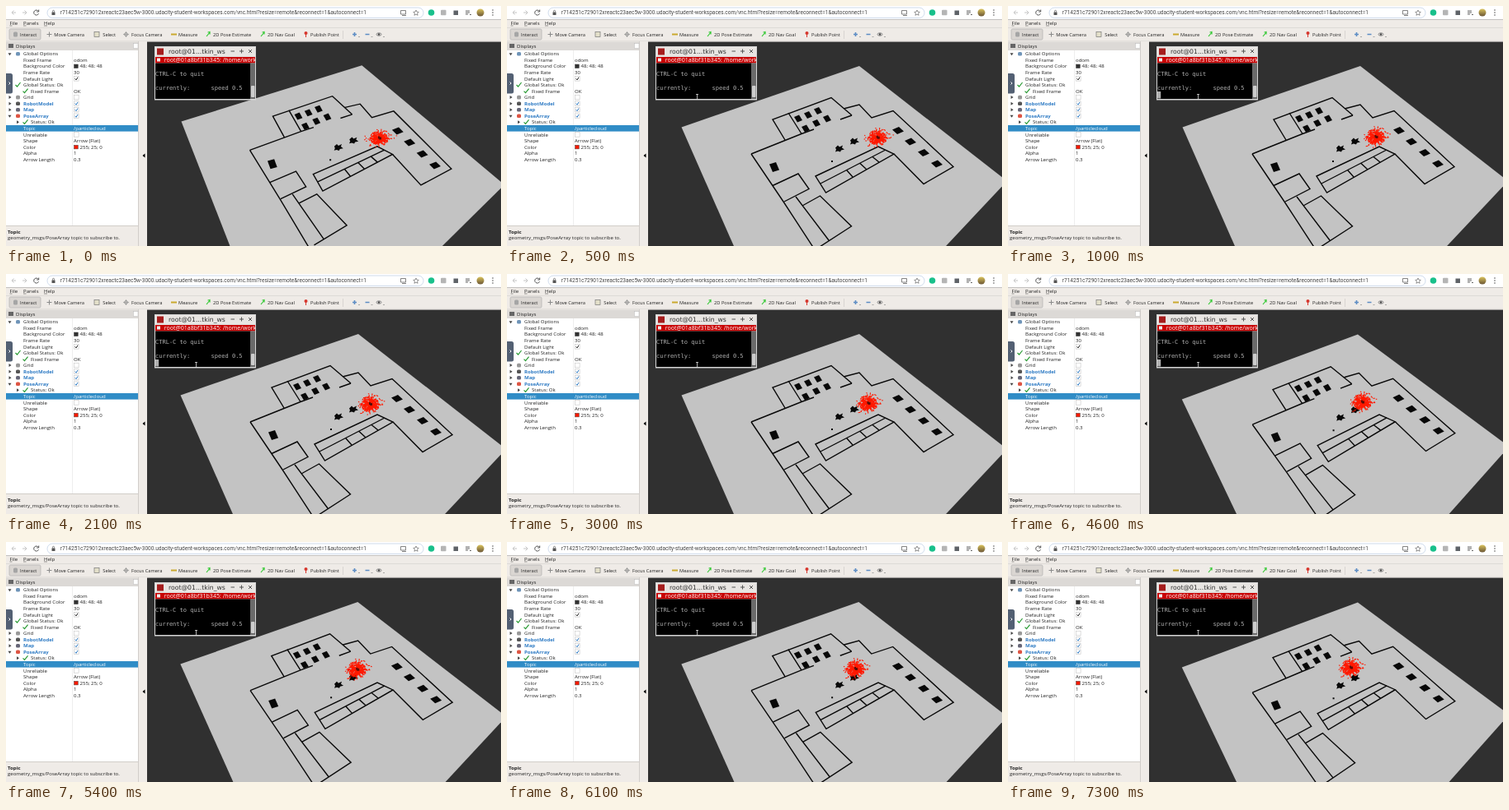
Animation, 600 px wide and 292 px high, one loop 7400 ms. Source, as an HTML page:

```html
<!DOCTYPE html>
<html lang="en">
<head>
<meta charset="utf-8">
<title>Robot localization</title>
<style>
html, body { margin: 0; width: 100%; height: 100%; overflow: hidden; background: #303030; }
svg { display: block; width: 100vw; height: 100vh; }
text { font: 6.05px "Open Sans", "Noto Sans", sans-serif; fill: #222; white-space: pre; }
.bold { font-weight: 700; }
.tool { font-size: 5.7px; }
.url { font: 6.53px Roboto, sans-serif; fill: #444; }
.title { font: 7.7px "DejaVu Sans", sans-serif; fill: #333; }
.tab { font-size: 7.05px; fill: #fff; }
.mono { font: 7.03px "DejaVu Sans Mono", monospace; fill: #b0b0b0; }
.line { fill: none; stroke: #555; stroke-width: 1; }
.walls { fill: none; stroke: #080808; stroke-width: 1.4; }
</style>
</head>
<body>
<svg viewBox="0 0 600 292" preserveAspectRatio="none">
  <defs>
    <clipPath id="view"><rect x="171" y="43" width="429" height="249"/></clipPath>
    <clipPath id="terminalClip"><rect x="180" y="49" width="122" height="64"/></clipPath>
    <linearGradient id="portrait" x2="0" y2="1">
      <stop stop-color="#d9c25c"/><stop offset="1" stop-color="#6b5636"/>
    </linearGradient>
  </defs>

  <g clip-path="url(#view)">
    <rect x="171" y="43" width="429" height="249" fill="#303030"/>
    <g id="map">
      <path fill="#c3c3c3" d="M211.500 147.500L427 73L606 213L490 337L296 340Z"/>
      <path class="walls" d="
        M337 163L322 138L393 111.500L418 133M341 130L357 155.500
        M296 180L357 155.500L372 150M404 138L418 133
        M408 125L427 120L442 136L468 127.500L541 195.500L505 216.500L469 180
        M322 218.500L353 204L366 222.500L336 238
        M374 207L450 171L469 180L386.500 227ZM380 216L459 175
        M412 200L419 208M428 191.500L436 199M443 183.500L451 190"/>
      <path class="walls" stroke-width="1.8" d="M296 180L335 238L374 298M350 232L390 285M358 243L379.500 231L417.500 268L379 293"/>
      <g id="desks" fill="#080808"></g>
    </g>
    <g id="cloud">
      <path id="arrows" fill="none" stroke="#ff1900" stroke-width="1.1"/>
      <path fill="#5a0d08" d="M-2-2h2v1h2v3h-3v-1h-1z"/>
    </g>
  </g>

  <g id="ui"></g>

  <g id="terminal">
    <rect x="180" y="49" width="123" height="65.500" fill="#d6d6d6"/>
    <rect x="181" y="50" width="121" height="11.500" fill="#e8e5e2"/>
    <rect x="183" y="51.500" width="8" height="8" fill="#a51d1d"/>
    <text class="title" x="197" y="58">root@01...tkin_ws</text>
    <path class="line" d="M272.500 55h4.500M283 55h5M285.500 52.500v5M294 53l4 4M298 53l-4 4"/>
    <rect x="181" y="62" width="121" height="7.500" fill="#c90000"/>
    <rect x="183" y="63.500" width="4" height="4" fill="#eee"/>
    <text class="tab" x="191.700" y="68" clip-path="url(#terminalClip)">root@01a8bf31b345: /home/work</text>
    <rect x="181" y="69.500" width="115.500" height="43.500"/>
    <rect x="296.500" y="69.500" width="5.500" height="43.500" fill="#6a6a6a"/>
    <rect x="297" y="97" width="4.500" height="14" rx="1" fill="#ccc"/>
    <text class="mono" x="181" y="84.700">CTRL-C to quit</text>
    <text class="mono" x="181" y="102">currently:      speed 0.5</text>
    <rect id="caret" x="181" y="104" width="4.200" height="8.500" fill="#b0b0b0"/>
    <path id="pointer" fill="none" stroke="#ddd" stroke-width=".8" d="M229 107.500h3M230.500 107.500v6M229 113.500h3"/>
  </g>
</svg>
<script>
const LOOP = 7400;
const $ = id => document.getElementById(id);

const rect = (x, y, w, h, fill, more = '') =>
  `<rect x="${x}" y="${y}" width="${w}" height="${h}" fill="${fill}" ${more}/>`;
const dot = (x, y, r, fill) => `<circle cx="${x}" cy="${y}" r="${r}" fill="${fill}"/>`;
const line = (d, color = '#555', width = 1) =>
  `<path d="${d}" fill="none" stroke="${color}" stroke-width="${width}"/>`;
const label = (x, y, text, cls = '', fill = '') =>
  `<text x="${x}" y="${y}" class="${cls}" ${fill && `style="fill:${fill}"`}>${text}</text>`;

function browserBar() {
  const url = 'r714251c729012xreactc23aec5w-3000.udacity-student-workspaces.com' +
    '/vnc.html?resize=remote&amp;reconnect=1&amp;autoconnect=1';
  return rect(0, 0, 600, 16.5, '#fff') +
    rect(50, 2, 456, 12.5, '#fff', 'rx="6.200" stroke="#c3d2e6" stroke-width=".8"') +
    line('M12 8h-5M9.500 5.500l-2.500 2.500l2.500 2.500M20 8h5M22.500 5.500l2.500 2.500l-2.500 2.500', '#c4c4c4') +
    line('M39.300 6.500a3 3 0 1 0 .2 2.700M39.700 4.500v2.500h-2.500') +
    rect(55.5, 7.5, 4, 3.5, '#555') + line('M56.500 7.500v-1.200a1 1 0 0 1 2 0v1.200', '#555', .7) +
    label(65.8, 10.4, url, 'url') +
    line('M478.500 5.500h6v4.500h-6zM480 11.500h5', '#666', .8) +
    line('M497 5l1 2.200 2.300.2-1.800 1.600.6 2.300-2.100-1.200-2.100 1.200.6-2.300-1.800-1.600 2.300-.2z', '#666', .7) +
    dot(515.5, 8, 3.8, '#19c08b') + rect(527, 4.7, 6.5, 6.5, '#b5b5b5', 'rx="1"') +
    rect(542.5, 5.5, 5.5, 5.5, '#5f6368') + line('M557 6h5M557 8h5M557 10h3M562 10.500h2', '#555', .9) +
    dot(575, 8, 4.5, 'url(#portrait)') +
    [5, 8, 11].map(y => dot(590, y, .8, '#555')).join('');
}

function toolbar() {
  const tools = [[17, 'Interact'], [58.3, 'Move Camera'], [117.3, 'Select'], [152, 'Focus Camera'],
    [209, 'Measure'], [251, '2D Pose Estimate'], [317, '2D Nav Goal'], [369, 'Publish Point']];
  return rect(0, 16.5, 600, 27, '#efebe7') +
    label(4.5, 22.9, 'File') + label(21, 22.9, 'Panels') + label(46, 22.9, 'Help') +
    line('M4.500 24h3M21 24h3.500M46 24h4', '#333', .5) +
    line('M0 26.500H600M0 42.800H600', '#d2cfcc', .6) +
    rect(4, 28, 38, 13, '#dad6d2', 'rx="1.500" stroke="#aaa" stroke-width=".6"') +
    tools.map(([x, name]) => label(x, 36.5, name, 'tool')).join('') +
    rect(9, 31.5, 5, 6, '#a5a5a5', 'rx="1.500"') +
    line('M49.500 34.500h6M52.500 31.500v6', '#8a8a8a') +
    rect(107, 31.5, 6, 6, '#e3dfc9', 'stroke="#777" stroke-width=".7"') +
    `<circle cx="145.500" cy="34.500" r="2" class="line" style="stroke:#999"/>` +
    line('M142 34.500h7M145.500 31v7', '#888', .6) +
    line('M200 34.500h7', '#caa92e', 2) +
    [243, 309].map(x => line(`M${x} 37l4-5M${x + 1.5} 32l2.500-.5v3`, '#36c936', 1.2)).join('') +
    dot(363.5, 33, 2, '#d6362c') + line('M363.500 34v4', '#d6362c') +
    line('M408.500 30v10', '#cfcbc7', .7) +
    line('M420 34.500h5M422.500 32v5M435.500 34.500h5', '#5c8cc4', 1.6) +
    `<ellipse cx="452" cy="34.500" rx="3" ry="1.700" class="line" style="stroke:#888"/>` + dot(452, 34.5, 1.2, '#444') +
    line('M427 37.500h2M442.500 37.500h2M457 37.500h2', '#888', .7);
}

function displaysPanel() {
  const blue = '#2e7bc4';
  // [indent, name, value, arrow, options]; true and false values are checkboxes.
  const rows = [
    [21, 'Global Options', '', 'v', { icon: '#6f94b8' }],
    [21, 'Fixed Frame', 'odom'],
    [21, 'Background Color', '48; 48; 48', '', { swatch: '#303030' }],
    [21, 'Frame Rate', '30'],
    [21, 'Default Light', true],
    [21, 'Global Status: Ok', '', 'v', { tick: 14 }],
    [30, 'Fixed Frame', 'OK', '', { tick: 23 }],
    [21, 'Grid', false, '>', { icon: '#999' }],
    [21, 'RobotModel', true, '>', { icon: '#555', bold: true }],
    [21, 'Map', true, '>', { icon: '#667', bold: true }],
    [21, 'PoseArray', true, 'v', { icon: '#d54', bold: true }],
    [30, 'Status: Ok', '', '>', { tick: 23, arrowX: 14 }],
    [21, 'Topic', '/particlecloud', '', { selected: true }],
    [21, 'Unreliable', false],
    [21, 'Shape', 'Arrow (Flat)'],
    [21, 'Color', '255; 25; 0', '', { swatch: '#ff1900' }],
    [21, 'Alpha', '1'],
    [21, 'Arrow Length', '0.3'],
  ];
  const drawRow = ([x, name, value, arrow, opt = {}], i) => {
    const y = 58.2 + i * 7.56;
    const ink = opt.selected ? '#fff' : opt.bold ? blue : '#222';
    const ax = opt.arrowX || 4.5;
    let out = opt.selected ? rect(0, y - 3.9, 160, 7.6, '#308cc6') : '';
    if (arrow === 'v') out += `<path d="M${ax - 2} ${y - 1}h4l-2 3z" fill="#444"/>`;
    if (arrow === '>') out += `<path d="M${ax - 1} ${y - 2}v4l3-2z" fill="#444"/>`;
    if (opt.tick) out += line(`M${opt.tick - 2.5} ${y}l2 2l4-5`, '#289a32', 1.2);
    if (opt.icon) out += rect(12, y - 2.3, 5, 4.6, opt.icon, 'rx="1.500"');
    out += label(x, y + 2.1, name, opt.bold ? 'bold' : '', ink);
    if (typeof value === 'boolean') {
      out += rect(82.5, y - 2.9, 5.6, 5.6, '#fff', 'stroke="#c5c5c5" stroke-width=".6"');
      if (value) out += line(`M83.700 ${y}l1.300 1.500l2-3.200`, opt.bold ? blue : '#222');
    } else {
      if (opt.swatch) out += rect(82.5, y - 2.3, 4.8, 4.6, opt.swatch, 'stroke="#444" stroke-width=".5"');
      out += label(opt.swatch ? 89.5 : 82, y + 2.1, value, '', ink);
    }
    return out;
  };
  return rect(0, 43, 171, 249, '#efebe7') +
    rect(0, 43.5, 160, 10.5, '#dcd9d6') + rect(3, 46, 6, 5, '#666') +
    label(12, 50.8, 'Displays') +
    rect(154.5, 45.5, 5.5, 6, '#fff', 'stroke="#bbb" stroke-width=".5"') +
    rect(0, 54, 160, 213, '#fff') + line('M80.500 54V267', '#e3e3e3', .6) + rows.map(drawRow).join('') +
    line('M160.500 43V292M0 267.500H160', '#c4c1be', .7) +
    label(2, 276.7, 'Topic', 'bold') +
    label(2, 283.5, 'geometry_msgs/PoseArray topic to subscribe to.') +
    `<path d="M168.500 179.500v5l-3-2.500z"/>` +
    rect(-3, 82, 11, 24.5, '#536073', 'rx="2.500"') + line('M3.500 92.500l1.500 1.500l-1.500 1.500', '#fff');
}

$('ui').innerHTML = browserBar() + toolbar() + displaysPanel();

function placeDesks() {
  const shapes = [
    ['-5 -2L1 -4.500L5 2L-1 4.500', [[353, 137], [365, 132.5], [377, 127.5], [362, 149], [375, 142.5], [388, 137]]],
    ['-7 -1L1 -4.500L7 1L-1 4.500', [[474, 151.5], [489, 165], [505, 178.5], [521, 192]]],
    ['-6 -3.500L2 -6L6 3.500L-2 6', [[324, 196]]],
    ['-5 -1L-2 -4L0 -2L4 -4L3 -1L6 1L2 2L1 4L-2 3L-5 4L-4 1', [[403, 173.5], [421, 164.5]]],
    ['-1 -1L1 -1L1 1L-1 1', [[394, 189]]],
  ];
  $('desks').innerHTML = shapes.map(([d, spots]) =>
    spots.map(p => `<path d="M${d}Z" transform="translate(${p})"/>`).join('')).join('');
}
placeDesks();

let seed = 7;
const random = () => (seed = seed * 16807 % 2147483647) / 2147483647;
const gaussian = () => (random() + random() + random() + random() - 2) * 1.73;
const particles = Array.from({ length: 300 }, (_, i) => {
  const x = gaussian(), y = gaussian();
  return { x, y, stray: i % 10 === 0, heading: Math.atan2(y, x) + gaussian() };
});

function arrowPath(scatter) {
  return particles.map(p => {
    const spreadX = p.stray ? 8 + 2 * scatter : 4.3;
    const spreadY = p.stray ? 6 - scatter : 4 - .7 * scatter;
    const length = p.stray ? 1.5 : 2.6;
    return `M${(p.x * spreadX).toFixed(1)} ${(p.y * spreadY).toFixed(1)}` +
      `l${(Math.cos(p.heading) * length).toFixed(1)} ${(Math.sin(p.heading) * length).toFixed(1)}`;
  }).join('');
}

const robotPath = [[0, 453, 160.5], [1000, 446.5, 159], [2100, 442, 158], [3000, 438.5, 157],
  [4600, 430, 155.5], [6100, 423, 154], [7400, 415.5, 152.5]];

function robotAt(t) {
  const i = robotPath.findIndex(key => key[0] > t);
  const [a, b] = [robotPath[i - 1], robotPath[i]];
  const k = (t - a[0]) / (b[0] - a[0]);
  return [1, 2].map(n => a[n] + (b[n] - a[n]) * k);
}

// Pose corrections turn the ground plane slightly.
const corrections = [[0, -1], [500, 0], [3800, .7], [5400, .15], [6700, .7]];

function draw(now) {
  const t = Math.floor(now % LOOP / 100) * 100;
  const turn = corrections.filter(c => c[0] <= t).pop()[1];
  const kx = .045 * turn, ky = -.029 * turn;
  $('map').setAttribute('transform', `matrix(1 ${ky} ${kx} 1 ${-170 * kx} ${-455 * ky})`);
  $('cloud').setAttribute('transform', `translate(${robotAt(t)})`);
  $('arrows').setAttribute('d', arrowPath(Math.max(0, 1 - t / 1000)));
  $('caret').style.display = t % 1200 >= 620 ? '' : 'none';
  $('pointer').style.display = t >= 500 ? '' : 'none';
}

const start = performance.now();
function tick() {
  draw(performance.now() - start);
  requestAnimationFrame(tick);
}
tick();
</script>
</body>
</html>
```
